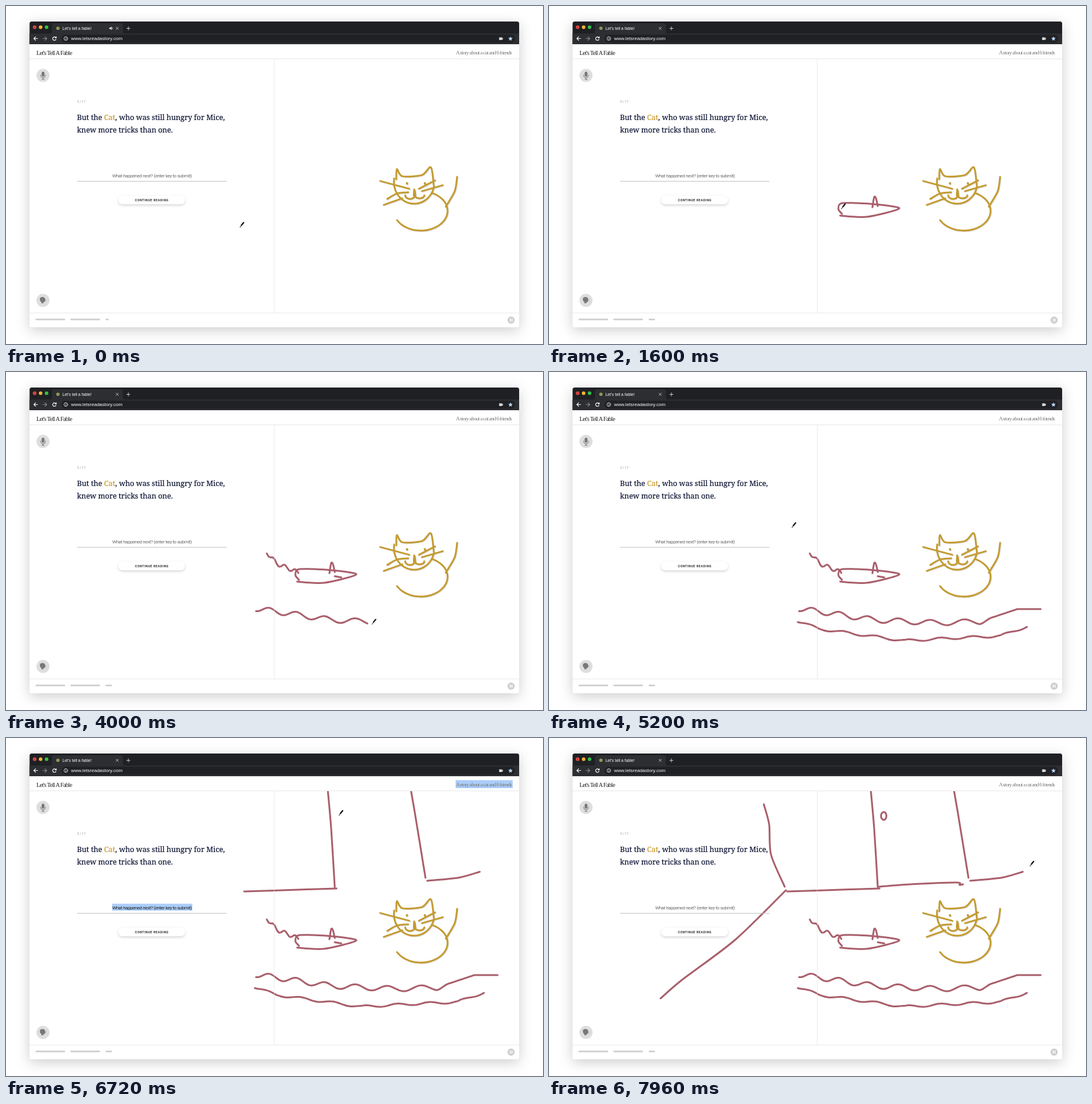
Write an HTML page that moves like this. It is 900 by 566 pixels and loops after 8 s.

```html
<!DOCTYPE html>
<html lang="en">
<head>
<meta charset="utf-8">
<title>Drawing along with a story</title>
<style>
  html, body { margin: 0; width: 100%; height: 100%; overflow: hidden; background: #fff; }
  svg { display: block; width: 100%; height: 100%; }
  .line { fill: none; stroke-linecap: round; stroke-linejoin: round; }
  .window { filter: drop-shadow(0 5px 11px rgba(0,0,0,.2)); }
  .button { filter: drop-shadow(0 2px 2px rgba(0,0,0,.16)); }
  .chrome { font-family: "Liberation Sans", Arial, sans-serif; fill: #fff; }
  .serif { font-family: "Liberation Serif", Times, serif; }
  .story { font: 12.3px "Noto Serif", serif; fill: #0d1433; stroke: #0d1433; stroke-width: .2; }
  .name { fill: #cb9b2c; stroke: #cb9b2c; }
  .sans { font-family: Roboto, sans-serif; }
</style>
</head>
<body>
<svg viewBox="0 0 900 566" preserveAspectRatio="none">
  <defs>
    <clipPath id="page"><rect x="40" y="89" width="820" height="425"/></clipPath>
  </defs>

  <rect width="900" height="566" fill="#fff"/>
  <rect class="window" x="39.5" y="26" width="820.5" height="512" rx="3.5" fill="#fff"/>

  <!-- browser bar -->
  <path fill="#1f2024" d="M39.5 64V29.5q0-3.5 3.5-3.5H856.5q3.5 0 3.5 3.5V64z"/>
  <path fill="#2d2e32" d="M39.5 46H74q3 0 3-3V33q0-4 4-4H192q4 0 4 4V43q0 3 3 3H860V64H39.5z"/>
  <rect x="93" y="48" width="760" height="13.5" rx="6.7" fill="#202124"/>
  <circle cx="48" cy="35.5" r="3" fill="#e8504a"/>
  <path class="line" d="M46.9 34.4l2.2 2.2m0-2.2l-2.2 2.2" stroke="#8c1d17" stroke-width=".7"/>
  <circle cx="58" cy="35.5" r="3" fill="#f3b530"/>
  <circle cx="68" cy="35.5" r="3" fill="#35c04a"/>
  <circle cx="87" cy="37.3" r="2.8" fill="#8f9a55"/>
  <text class="chrome" x="94.5" y="39.6" font-size="6.8">Let's tell a fable!</text>
  <g id="sound" class="line" stroke="#ddd" stroke-width=".8">
    <path d="M173.7 36.5h1.2l1.9-1.5v4.6l-1.9-1.5h-1.2z" fill="#ddd"/>
    <path d="M178.2 35.9q1.3 1.4 0 2.8"/>
  </g>
  <path class="line" stroke="#d5d6d8" stroke-width=".9" d="M184.5 35.5l3.8 3.8m0-3.8l-3.8 3.8M202.3 37.5h5.6m-2.8-2.8v5.6"/>
  <g class="line" stroke="#fff" stroke-width="1.2">
    <path d="M53 54.5H46.7m2.9-2.9l-2.9 2.9 2.9 2.9"/>
    <path d="M62 54.5h6.3m-2.9-2.9l2.9 2.9-2.9 2.9" stroke="#85868a"/>
    <path d="M83.7 53.2a2.9 2.9 0 1 0 .1 2.6M84.2 51.5v2h-2"/>
    <path d="M100.3 54.3v1.9m0-3.4v.1" stroke-width=".8"/>
    <circle cx="100.3" cy="54.5" r="3.1" stroke-width=".8"/>
  </g>
  <text class="chrome" x="109" y="57.2" font-size="8">www.letsreadastory.com</text>
  <path fill="#d8d9db" d="M826.5 52.5h4.5v1.3l1.7-1v3.9l-1.7-1v1.3h-4.5z"/>
  <path fill="#b5d3f7" d="M845.5 50.9l1.1 2.4 2.6.3-1.9 1.8.5 2.6-2.3-1.3-2.3 1.3.5-2.6-1.9-1.8 2.6-.3z"/>

  <!-- page frame -->
  <path class="line" stroke="#e8e8e8" d="M40 88.5H860M40 514H860"/>
  <g id="marks" fill="#abcdf8">
    <rect x="753.5" y="70.5" width="95.8" height="13.5"/>
    <rect x="178" y="277.5" width="134.3" height="11.5"/>
  </g>
  <text class="serif" x="51" y="81.6" font-size="10.4" letter-spacing="-.75" fill="#222">Let's Tell A Fable</text>
  <text class="serif" x="754" y="81" font-size="9.2" letter-spacing="-.78" fill="#777">A story about a cat and 6 friends</text>

  <g id="cat" class="line" stroke-width="2.8"></g>
  <g id="ink" class="line" stroke="#a95f6c" stroke-width="3" clip-path="url(#page)"></g>
  <path stroke="#e0e0e0" stroke-opacity=".65" d="M449.5 89V514"/>

  <!-- left column -->
  <circle cx="62" cy="116.3" r="11" fill="#dedede"/>
  <rect x="59.7" y="110" width="4.8" height="8.5" rx="2.4" fill="#77777c"/>
  <path class="line" stroke="#77777c" d="M58 115.5v1q.5 3.8 4.1 3.8t4.1-3.8v-1M62.1 120.5v2m-2 .3h4"/>
  <text class="sans" x="119" y="162" font-size="5.5" fill="#999">3 / 17</text>
  <text class="story" x="119" y="191">But the <tspan class="name">Cat</tspan>, who was still hungry for Mice,</text>
  <text class="story" x="119" y="211.5">knew more tricks than one.</text>
  <text id="prompt" class="sans" x="178" y="286.6" font-size="8" letter-spacing="-.46">What happened next? (enter key to submit)</text>
  <path stroke="#c2c2c2" d="M119 293.5H369.5"/>
  <rect class="button" x="188" y="317.5" width="112" height="14.5" rx="7.2" fill="#fff"/>
  <text class="sans" x="216.3" y="327" font-size="5" font-weight="700" letter-spacing=".6" fill="#222">CONTINUE READING</text>
  <circle cx="62" cy="493" r="11" fill="#dedede"/>
  <path fill="#77777c" d="M57 493q-1.5-5.5 4-5.7 4.2.1 4.6 3.7l1 2.2-1.2.4q.2 2.7-2.6 2.3l-.2 1.9h-3.4v-2.3q-1.8-.9-2.2-2.5z"/>
  <path class="line" stroke="#aaa" stroke-width=".8" d="M67.8 490.5v.1m0 2.4v.1m0 2.4v.1"/>

  <!-- footer -->
  <g fill="#cecece">
    <rect x="49.5" y="523.6" width="49.5" height="2.6" rx="1"/>
    <rect x="108" y="523.6" width="49.5" height="2.6" rx="1"/>
    <rect id="bar" x="167" y="523.6" height="2.6" rx="1"/>
    <circle cx="846.5" cy="526" r="6"/>
  </g>
  <path stroke="#fff" stroke-width="1.5" d="M845.2 523.4v5.2M848 523.4v5.2"/>

  <g id="pen" class="line" stroke="#111">
    <path d="M.2 -.2L2 -3" stroke-width="1"/>
    <path d="M2.5 -3.8L6.2 -8.3" stroke-width="2.2"/>
  </g>
</svg>

<script>
const LOOP = 8000, LAG = 20, TAU = Math.PI * 2;
const el = id => document.getElementById(id);
const clamp = x => Math.max(0, Math.min(1, x));
const ease = x => x * x * (3 - 2 * x);
const show = (node, on) => node.setAttribute('visibility', on ? 'visible' : 'hidden');
const points = text => text.split(' ').map(s => s.split(',').map(Number));

// Catmull-Rom path through points; k sets the roundness
function smooth(p, k = 0.14) {
  const at = i => p[Math.max(0, Math.min(p.length - 1, i))];
  let d = 'M' + p[0];
  for (let i = 0; i < p.length - 1; i++) {
    const [a, b, c, e] = [at(i - 1), at(i), at(i + 1), at(i + 2)];
    d += `C${b.map((v, j) => v + (c[j] - a[j]) * k)} ${c.map((v, j) => v - (e[j] - b[j]) * k)} ${c}`;
  }
  return d;
}
const curve = text => smooth(points(text));

// Part of an ellipse, angles in degrees, clockwise from the right
function arc(cx, cy, rx, ry, from, to, n = 16) {
  return smooth(Array.from({ length: n + 1 }, (_, i) => {
    const a = (from + (to - from) * i / n) * TAU / 360;
    return [cx + rx * Math.cos(a), cy + ry * Math.sin(a)];
  }));
}

// A rippling line: crests sit at crest + period * u + growth * u²
function ripple(text, amp, crest, period, growth = 0, still = 900) {
  const keys = points(text), out = [];
  for (let i = 0; i < keys.length - 1; i++) {
    const [x0, y0] = keys[i], [x1, y1] = keys[i + 1];
    const n = Math.ceil(Math.abs(x1 - x0) / 4);
    for (let j = i ? 1 : 0; j <= n; j++) {
      const x = x0 + (x1 - x0) * j / n, dx = x - crest;
      const u = 2 * dx / (period + Math.sqrt(period * period + 4 * growth * dx));
      const y = y0 + (y1 - y0) * j / n;
      out.push([x, y - amp * clamp((still - x) / 20) * Math.cos(TAU * u)]);
    }
  }
  return smooth(out);
}

const whiskers = ['627,293 676,306', '639,323 655,314 674,312', '633,333 664,322', '692,306 719,292', '697,310 732,300'];
const catPath = [
  curve('654,290 655,273 664,285 697,283 712,270 717,302'),
  arc(684, 295, 34, 36, 190, 16),
  ...whiskers.map(curve),
  arc(672, 297, .4, .8, 0, 360),
  arc(702, 297, .4, .8, 0, 360),
  curve('684,307 683.5,318 686,318 685,309'),
  arc(677, 317, 8, 6, 180, 0),
  arc(693, 317, 8, 5, 180, 0),
  arc(695, 343, 45, 33, -66, 152),
  curve('756,286 752,310 737,336')
].join('');
el('cat').innerHTML =
  `<path d="${catPath}" stroke="#d8d4cb" transform="translate(1 1)"/><path d="${catPath}" stroke="#c49a2e"/>`;

// The pen's journey: drawn strokes and plain stops
const legs = [];
function draw(from, to, d) {
  legs.push({ from, to, d, at: p => legs.path });
}
function stop(time, x, y) {
  legs.push({ from: time, to: time, at: () => ({ x, y }) });
}

stop(0, 392, 371);
draw(400, 1120, curve('491,348 485,340 492,330 545,332 587,339 533,353 488,351')); // mouse
draw(1220, 1430, curve('542,337 545,320 548,322 551,335'));
stop(1600, 490, 340);
draw(1670, 2060, ripple('490,336 479,331 454,321 437,302', 3.5, 485, 18));
draw(2160, 2250, curve('551,342 562,344'));
stop(2560, 613, 204);
draw(3490, 4540, ripple('419,396 545,415 650,420 722,418 785,397 824,397', 4.5, 441, 44, 1.4, 745)); // floor
draw(4620, 5040, ripple('801,426 757,442 668,446 596,450 452,430 417,417', 2, 656, 54));
stop(5200, 407, 261);
draw(5260, 5520, curve('399,257 490,254 554,252')); // walls and door
draw(5550, 5830, curve('551,250 545,152 539,84'));
draw(5960, 6240, curve('678,84 685,124 703,234'));
draw(6290, 6460, curve('706,239 758,234 794,224'));
stop(6720, 558, 130);
draw(6760, 6900, arc(561, 130.5, 4.5, 6.5, -110, 250));
draw(7020, 7200, curve('360,111 369,145 372,195 395,249'));
draw(7230, 7460, curve('397,255 312,338 223,405 187,436'));
draw(7590, 7820, curve('553,249 605,245 683,242 688,246 694,245'));
stop(7960, 806, 215);

const strokes = legs.filter(leg => leg.d);
el('ink').innerHTML = strokes.map(s => `<path d="${s.d}"/>`).join('');
strokes.forEach((s, i) => {
  s.path = el('ink').children[i];
  s.len = s.path.getTotalLength();
  s.at = p => s.path.getPointAtLength(p * s.len);
});

function penAt(t) {
  const i = legs.findLastIndex(leg => leg.from <= t);
  const a = legs[i], b = legs[i + 1];
  if (t < a.to) return a.at((t - a.from) / (a.to - a.from));
  const p = a.at(1);
  if (!b) return p;
  const q = b.at(0), k = ease((t - a.to) / (b.from - a.to));
  return { x: p.x + (q.x - p.x) * k, y: p.y + (q.y - p.y) * k };
}

function render(t) {
  for (const { path, len, from, to } of strokes) {
    const p = clamp((t - LAG - from) / (to - from));
    show(path, p > 0);
    path.setAttribute('stroke-dasharray', p < 1 ? `${p * len} ${len + 10}` : 'none');
  }
  const { x, y } = penAt(t);
  el('pen').setAttribute('transform', `translate(${x} ${y})`);
  el('bar').setAttribute('width', 5 + 5.6 * clamp(t / 840));
  show(el('sound'), t < 1300);
  const selected = t >= 5840 && t < 6760;
  show(el('marks'), selected);
  el('prompt').setAttribute('fill', selected ? '#222' : '#6c6c6c');
}

const start = performance.now();
function tick() {
  render(Math.max(0, performance.now() - start) % LOOP);
  requestAnimationFrame(tick);
}
render(0);
requestAnimationFrame(tick);
</script>
</body>
</html>
```
